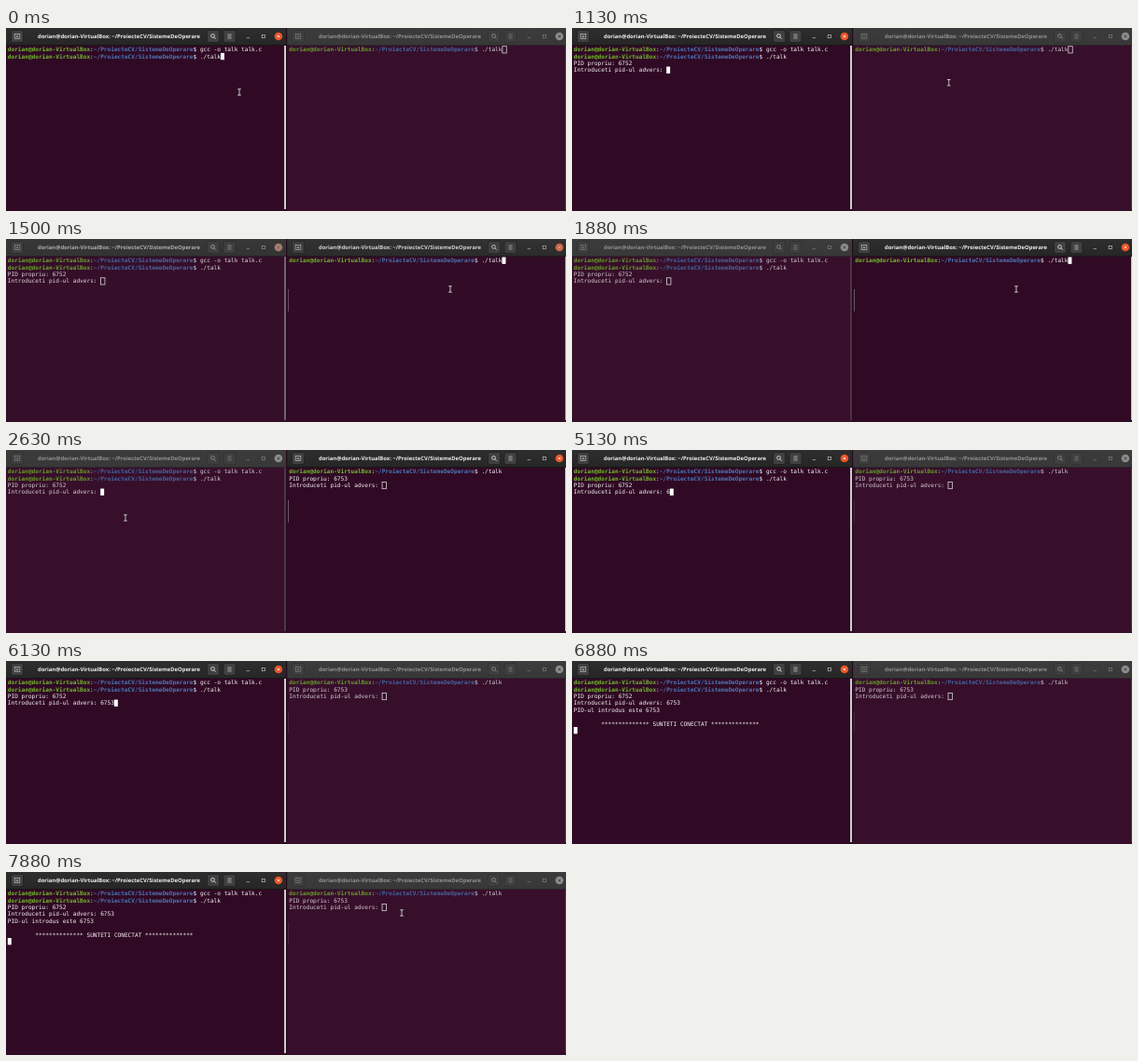
An HTML page with a canvas for the animation above (8 s loop, 600 by 197 pixels).

```html
<!DOCTYPE html>
<html lang="ro">
<head>
<meta charset="utf-8">
<title>Talk</title>
<style>
html, body { margin: 0; width: 100%; height: 100%; overflow: hidden; background: #300a24; }
canvas { display: block; width: 600px; height: 197px; }
</style>
</head>
<body>
<canvas id="stage" width="600" height="197"></canvas>
<script>
const ctx = document.getElementById('stage').getContext('2d');
const LOOP = 8000;
const CELL = 3.68, ROW = 7.36, TOP = 19.5;
const HOST = 'dorian@dorian-VirtualBox';
const DIR = '~/ProiecteCV/SistemeDeOperare';
const MONO = '"DejaVu Sans Mono", monospace';
const SANS = '"Open Sans", "Noto Sans", sans-serif';
const GREEN = [114, 186, 44], BLUE = [76, 118, 182], WHITE = [246, 244, 245];
const BACK = [48, 10, 36], BACK_DIM = [55, 15, 43];

// Event times in ms
const RUN_LEFT = 630, FOCUS_RIGHT = 1385, RUN_RIGHT = 1900, FOCUS_LEFT = 2570;
const KEYS = [5080, 5250, 5600, 5800], ENTER = 6280;
const FADE_DELAY = 60, FADE = 80, BLINK = 600;

// Pointer path: time, x, y
const PATHS = [
  [[0, 250, 69], [720, 250, 69], [1380, 476, 54], [1900, 476, 54], [2380, 128, 73], [5060, 128, 73]],
  [[7500, 128, 73], [7750, 100, 66], [7880, 424, 44], [8000, 424, 44]]
];

const clamp = v => Math.max(0, Math.min(1, v));
const ease = v => v * v * (3 - 2 * v);
const mix = (a, b, k) => 'rgb(' + a.map((v, i) => Math.round(v + (b[i] - v) * k)).join(',') + ')';
const grey = (a, b, k) => mix([a, a, a], [b, b, b], k);

// Large font scaled down keeps fractional advances
function text(str, x, y, size, family, weight, color) {
  ctx.save();
  ctx.translate(x, y);
  ctx.scale(size / 100, size / 100);
  ctx.font = weight + ' 100px ' + family;
  ctx.textRendering = 'geometricPrecision';
  ctx.fillStyle = color;
  ctx.fillText(str, 0, 0);
  ctx.restore();
}

function box(x, y, w, h, color) {
  ctx.fillStyle = color;
  ctx.fillRect(x, y, w, h);
}

function frame(x, y, w, h, color, width) {
  ctx.strokeStyle = color;
  ctx.lineWidth = width;
  ctx.strokeRect(x, y, w, h);
}

function line(points, color, width) {
  ctx.strokeStyle = color;
  ctx.lineWidth = width;
  ctx.beginPath();
  points.forEach(([x, y], i) => i ? ctx.lineTo(x, y) : ctx.moveTo(x, y));
  ctx.stroke();
}

function disc(x, y, r, color) {
  ctx.beginPath();
  ctx.arc(x, y, r, 0, Math.PI * 2);
  ctx.fillStyle = color;
  ctx.fill();
}

function button(x, focus) {
  ctx.beginPath();
  ctx.roundRect(x - 6.5, 2.5, 13, 13, 2);
  ctx.fillStyle = grey(62, 64, focus);
  ctx.fill();
  ctx.strokeStyle = grey(48, 30, focus);
  ctx.lineWidth = 0.7;
  ctx.stroke();
}

function header(x, w, focus) {
  const ink = grey(145, 238, focus);
  const soft = grey(125, 190, focus);
  const fill = ctx.createLinearGradient(0, 0, 0, 18);
  fill.addColorStop(0, grey(60, 46, focus));
  fill.addColorStop(1, grey(56, 38, focus));
  box(x, 0, w, 18.5, fill);
  box(x, 18.2, w, 0.8, grey(42, 22, focus));

  [12, 222, 239.5].forEach(b => button(x + b, focus));
  frame(x + 9.2, 6.6, 5.6, 5, soft, 0.7);
  line([[x + 12, 7.8], [x + 12, 10.6]], soft, 0.7);
  line([[x + 10.6, 9.2], [x + 13.4, 9.2]], soft, 0.7);

  ctx.strokeStyle = ink;
  ctx.lineWidth = 0.8;
  ctx.beginPath();
  ctx.arc(x + 221.5, 8.4, 1.9, 0, Math.PI * 2);
  ctx.stroke();
  line([[x + 222.9, 9.8], [x + 224.7, 11.6]], ink, 0.9);
  [7, 9, 11].forEach(y => line([[x + 237.4, y], [x + 241.6, y]], soft, 0.8));

  line([[x + 257.6, 10.6], [x + 261, 10.6]], soft, 0.7);
  frame(x + 274.2, 7.4, 3.3, 3.3, soft, 0.7);
  const cross = grey(56, 245, focus);
  disc(x + 291.9, 9, 4.3, mix([140, 140, 140], [232, 84, 38], focus));
  line([[x + 290.5, 7.6], [x + 293.3, 10.4]], cross, 0.8);
  line([[x + 290.5, 10.4], [x + 293.3, 7.6]], cross, 0.8);

  text(HOST + ': ' + DIR, x + 34, 11.3, 5.85, SANS, 'bold', ink);
}

function terminal(x, rows, focus) {
  const tone = color => mix(BACK, color, 0.83 + 0.17 * focus);
  rows.forEach((row, r) => {
    const y = TOP + r * ROW + 5.9;
    let col = 0;
    const put = (str, color, weight) => {
      text(str, x + col * CELL, y, CELL / 0.602, MONO, weight, tone(color));
      col += str.length;
    };
    if (row.startsWith('$')) {
      put(HOST, GREEN, 'bold');
      put(':', WHITE, 'normal');
      put(DIR, BLUE, 'bold');
    }
    put(row, WHITE, 'normal');
  });
}

function caret(x, col, row, focused, lit) {
  const cx = x + col * CELL, cy = TOP + row * ROW;
  if (!focused) {
    frame(cx + 0.4, cy + 0.2, CELL + 0.7, ROW - 0.1, '#d8d2d6', 0.8);
  } else if (lit) {
    box(cx, cy, CELL + 0.3, ROW, '#fff');
  }
}

function pointer(t) {
  const path = PATHS.find(p => t >= p[0][0] && t < p[p.length - 1][0]);
  if (!path) return;
  const i = path.findIndex((p, n) => n && t < p[0]);
  const [t0, x0, y0] = path[i - 1], [t1, x1, y1] = path[i];
  const k = ease((t - t0) / (t1 - t0));
  const x = x0 + (x1 - x0) * k, y = y0 + (y1 - y0) * k;
  const bar = (color, width) => {
    line([[x, y - 3], [x, y + 3]], color, width);
    line([[x - 1.8, y - 3.2], [x + 1.8, y - 3.2]], color, width);
    line([[x - 1.8, y + 3.2], [x + 1.8, y + 3.2]], color, width);
  };
  bar('#1c0615', 1.8);
  bar('#e6e0e4', 0.9);
}

function draw(t) {
  const fade = from => clamp((t - from - FADE_DELAY) / FADE);
  const right = fade(FOCUS_RIGHT) - fade(FOCUS_LEFT);
  const left = 1 - right;
  const onRight = t >= FOCUS_RIGHT && t < FOCUS_LEFT;
  const ask = 'Introduceti pid-ul advers: ';
  const typed = '6753'.slice(0, KEYS.filter(k => t >= k).length);

  const rowsL = ['$ gcc -o talk talk.c', '$ ./talk'];
  const rowsR = ['$ ./talk'];
  if (t >= RUN_LEFT) rowsL.push('PID propriu: 6752', ask + typed);
  if (t >= RUN_RIGHT) rowsR.push('PID propriu: 6753', ask);
  if (t >= ENTER) {
    const stars = '*'.repeat(14);
    rowsL.push('PID-ul introdus este 6753', '', ' '.repeat(8) + stars + ' SUNTETI CONECTAT ' + stars, '');
  }

  const scrollbar = (x, w, focus) => box(x, 19, w, 176, mix([82, 50, 72], [208, 203, 207], focus));
  box(0, 0, 301, 197, mix(BACK_DIM, BACK, left));
  box(301, 0, 299, 197, mix(BACK_DIM, BACK, right));
  header(0, 300, left);
  header(301, 299, right);
  scrollbar(298, 2, left);
  scrollbar(599, 1, right);
  box(300, 0, 1.2, 197, '#240a1c');
  if (t >= FOCUS_RIGHT) box(302, 54, 1, 24, mix([72, 36, 60], [112, 88, 104], right));

  terminal(1.8, rowsL, left);
  terminal(303.3, rowsR, right);

  // Blinking restarts at each focus change or key press
  const marks = [0, RUN_LEFT, FOCUS_RIGHT, RUN_RIGHT, FOCUS_LEFT, ...KEYS, ENTER];
  const since = t - Math.max(...marks.filter(m => m <= t));
  const lit = since % (2 * BLINK) < BLINK + 20;
  const place = rows => {
    const last = rows[rows.length - 1];
    return [last.length + (last.startsWith('$') ? HOST.length + DIR.length + 1 : 0), rows.length - 1];
  };
  caret(1.8, ...place(rowsL), !onRight, lit);
  caret(303.3, ...place(rowsR), onRight, lit);
  pointer(t);
}

const start = performance.now();
function tick() {
  draw((performance.now() - start) % LOOP);
  requestAnimationFrame(tick);
}
tick();
</script>
</body>
</html>
```
